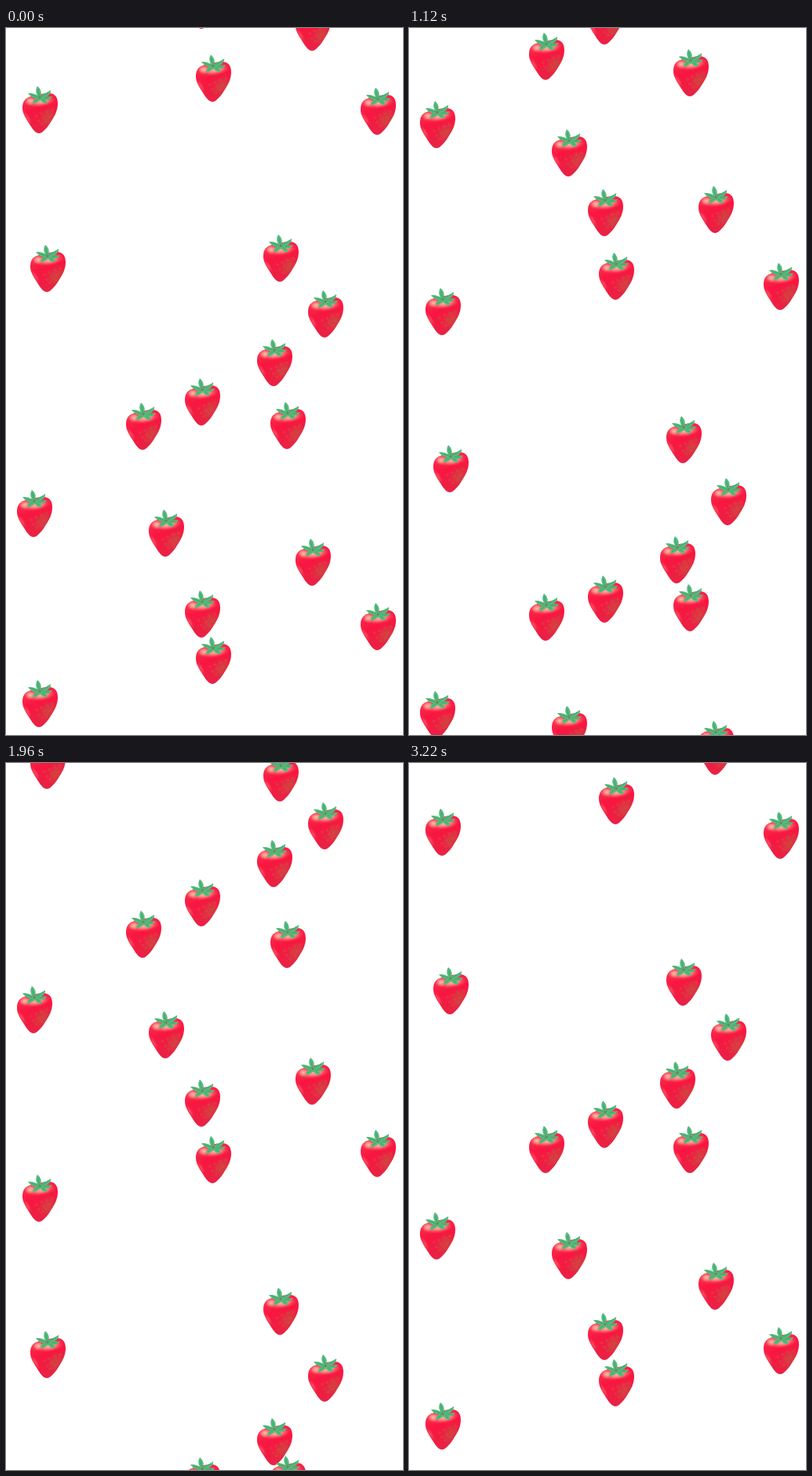
Write an HTML page that moves like this. It is 506x900 px and loops after 3290 ms.

```html
<!DOCTYPE html>
<html lang="en">
<head>
<meta charset="utf-8">
<title>Falling strawberries</title>
<style>
  html, body { margin: 0; width: 100%; height: 100%; overflow: hidden; background: #fff; }
  svg { display: block; width: 100%; height: 100%; }
</style>
</head>
<body>
<svg id="stage" viewBox="0 0 506 900">
  <defs>
    <linearGradient id="skin" x1=".2" y1="0" x2=".6" y2="1">
      <stop offset="0" stop-color="#fa3553"/>
      <stop offset=".4" stop-color="#f91640"/>
      <stop offset="1" stop-color="#e62445"/>
    </linearGradient>
    <radialGradient id="shine">
      <stop offset="0" stop-color="#ffc0a8"/>
      <stop offset=".45" stop-color="#fd9288" stop-opacity=".8"/>
      <stop offset="1" stop-color="#fc3a50" stop-opacity="0"/>
    </radialGradient>
    <radialGradient id="shade">
      <stop offset="0" stop-color="#c84c40" stop-opacity=".75"/>
      <stop offset=".5" stop-color="#d24340" stop-opacity=".55"/>
      <stop offset="1" stop-color="#e02a3c" stop-opacity="0"/>
    </radialGradient>
    <clipPath id="body">
      <path id="outline" d="M21 60C17 60 13 55 10 50C7 45 3 40 1 34C-.5 29 -.5 23 2 19C5 14 11 13 17 12C23 10 28 9 34 9C41 9 45 14 45 22C45 31 41 38 37 44C34 49 32 52 28 56C25 59 23 60 21 60Z"/>
    </clipPath>
    <g id="berry">
      <use href="#outline" fill="url(#skin)"/>
      <g clip-path="url(#body)">
        <ellipse cx="33" cy="40" rx="12" ry="16" fill="url(#shade)" transform="rotate(30 33 40)"/>
        <ellipse cx="24" cy="19" rx="20" ry="8" fill="url(#shine)" transform="rotate(-8 24 19)"/>
        <ellipse cx="10" cy="19" rx="9" ry="7" fill="url(#shine)"/>
        <ellipse cx="6" cy="40" rx="4" ry="11" fill="url(#shine)" opacity=".3" transform="rotate(-30 6 40)"/>
        <path d="M18 38h0M24 35h0M31 32h0M38 30h0M21 44h0M27 40h0M34 38h0M25 48h0M31 44h0" stroke="#e56a50" stroke-width="3.2" stroke-linecap="round" opacity=".5"/>
        <path d="M18 38h0M24 35h0M31 32h0M38 30h0M21 44h0M27 40h0M34 38h0M25 48h0M31 44h0" stroke="#cc3340" stroke-width="1.8" stroke-linecap="round"/>
      </g>
      <path fill="#55bb7e" d="M21 14C17 10 16 5 19 0C23 3 25 8 23 12C27 9 31 9 36 5C37 10 32 13 28 14C31 13 35 14 38 13C36 17 33 18 29 17C31 18 32 20 31 22C27 22 24 20 23 18C20 19 18 22 13 22C13 18 16 16 18 15C14 16 10 13 7 9C12 9 17 9 21 14Z"/>
      <path fill="none" stroke="#3ba368" stroke-width=".9" d="M22 14L19.5 4M23 14L33 8M20 14L11 11M20 16L15 20M25 16L29 20M27 15L34 15"/>
      <circle cx="22" cy="14.5" r="1.5" fill="#79804f"/>
    </g>
  </defs>
</svg>
<script>
const STEP = 70, STEPS = 47, HEIGHT = 60;
// Each column: left edge, top at time zero, distance fallen per loop
const columns = [
  [242, 34, 741], [21, 74, 756], [452, 76, 656], [369, -31, 681],
  [31, 276, 750], [328, 263, 679], [385, 334, 703], [320, 396, 736],
  [228, 446, 736], [337, 476, 681], [153, 477, 714], [14, 588, 751],
  [182, 613, 734], [228, 716, 775]
];
const stage = document.getElementById('stage');

function addBerry(x) {
  const berry = document.createElementNS(stage.namespaceURI, 'use');
  berry.setAttribute('href', '#berry');
  berry.setAttribute('x', x);
  return stage.appendChild(berry);
}

const pairs = columns.map(([x]) => [addBerry(x), addBerry(x)]);

function draw() {
  const step = Math.floor(performance.now() / STEP) % STEPS;
  columns.forEach(([, start, fall], i) => {
    const top = (start + fall * step / STEPS + HEIGHT) % fall - HEIGHT;
    pairs[i].forEach((berry, copy) => berry.setAttribute('y', Math.round(top + copy * fall)));
  });
  requestAnimationFrame(draw);
}
draw();
</script>
</body>
</html>
```
